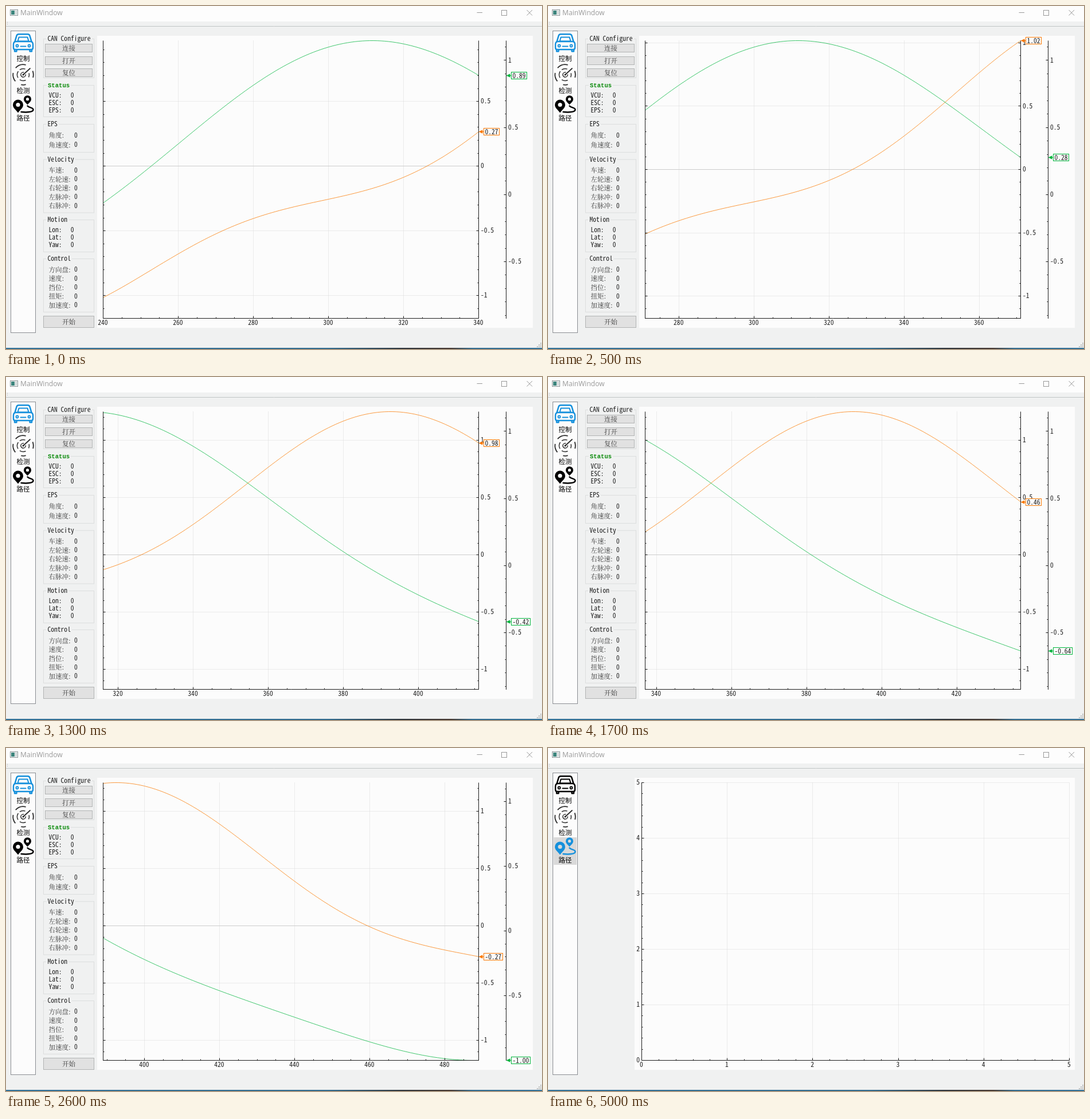
Animation, 935 px wide and 599 px high, one loop 7 s. Source, as an HTML page with a canvas:

```html
<!DOCTYPE html>
<html lang="zh">
<head>
<meta charset="utf-8">
<title>MainWindow</title>
<style>
  html, body { margin: 0; width: 100%; height: 100%; overflow: hidden; background: #f0f1f1; }
  canvas { display: block; }
</style>
</head>
<body>
<canvas id="stage" width="935" height="599"></canvas>
<script>
const ctx = document.getElementById('stage').getContext('2d');
const MONO_FAMILY = '"Noto Sans Mono CJK SC", "Liberation Mono", monospace';
const BG = '#f0f1f1', PAPER = '#fcfcfc', INK = '#1c1c1c', BLUE = '#1590dc';
const ORANGE = '#fa7800', GREEN = '#00b43c';
const TOP = 60.5, BOTTOM = 545.5, PITCH = 5.78;
const LOOP = 7000, STEP = 100, RADAR_AT = 2900, ROUTE_AT = 5000;

// the size that gives the monospaced font its character pitch
ctx.font = '100px ' + MONO_FAMILY;
const MONO = `${(PITCH * 100 / ctx.measureText('0').width).toFixed(2)}px ${MONO_FAMILY}`;
const CJK = '11.5px "Noto Serif CJK SC", "Noto Sans CJK SC", "Noto Sans CJK", serif';
const MENU = '11.5px "Noto Sans CJK SC", "Noto Sans CJK", sans-serif';

// [step, newest sample] pairs; samples arrive at a nearly constant rate
const SAMPLES = [[0, 340], [3, 360], [5, 371], [9, 394], [17, 437], [22, 466], [28, 501]];

const orangeAt = n => Math.sin(n / 50) + Math.sin(n / 50 / 0.3843) * 0.25;
const greenAt = n => Math.cos(n / 50) + Math.sin(n / 50 / 0.4364) * 0.15;

function newestSample(step) {
  const i = Math.max(1, SAMPLES.findIndex(s => s[0] >= step));
  const [a, from] = SAMPLES[i - 1], [b, to] = SAMPLES[i];
  return Math.round(from + (to - from) * (step - a) / (b - a));
}

function rangeOf(fn, last) {
  const values = Array.from({ length: last + 1 }, (_, n) => fn(n));
  return [Math.min(...values), Math.max(...values)];
}

const scale = ([lo, hi], from, to) => v => from + (v - lo) / (hi - lo) * (to - from);
const crisp = v => Math.floor(v) + 0.5;

function rect(x, y, w, h, fill, stroke) {
  if (fill) { ctx.fillStyle = fill; ctx.fillRect(x, y, w, h); }
  if (stroke) { ctx.strokeStyle = stroke; ctx.lineWidth = 1; ctx.strokeRect(x, y, w, h); }
}

function line(x1, y1, x2, y2, color = INK, dash = []) {
  ctx.strokeStyle = color;
  ctx.lineWidth = 1;
  ctx.setLineDash(dash);
  ctx.beginPath();
  ctx.moveTo(x1, y1);
  ctx.lineTo(x2, y2);
  ctx.stroke();
  ctx.setLineDash([]);
}

// y is the vertical middle of the digits or ideographs
function text(str, x, y, { font, color, align = 'left' } = {}) {
  const wide = /[\u4e00-\u9fff]/.test(str);
  ctx.font = font || (wide ? CJK : MONO);
  ctx.fillStyle = color || (wide ? '#3a3a3a' : INK);
  ctx.textAlign = align;
  ctx.fillText(str, x, y + (wide ? 4.3 : 3.7));
}

function ticks([lo, hi], step) {
  const list = [];
  for (let i = Math.ceil(lo / step - 1e-6); i <= hi / step + 1e-6; i++) list.push(i * step);
  return list;
}

function vAxis(x, range, major, minor, { dir = -1, label = 0 } = {}) {
  const y = scale(range, BOTTOM, TOP);
  line(x, TOP, x, BOTTOM + 0.5);
  ticks(range, minor).forEach(v => line(x, crisp(y(v)), x + dir * 2, crisp(y(v))));
  ticks(range, major).forEach(v => {
    line(x, crisp(y(v)), x + dir * 4, crisp(y(v)));
    const name = String(+v.toFixed(2));
    if (label > 0) text(name, x + 3.5, y(v));
    if (label < 0) text(name, x - 3.5, y(v), { align: 'right' });
  });
}

function hAxis(left, right, range, major, minor) {
  const x = scale(range, left, right);
  line(left, BOTTOM, right + 0.5, BOTTOM);
  ticks(range, minor).forEach(v => line(crisp(x(v)), BOTTOM, crisp(x(v)), BOTTOM - 2));
  ticks(range, major).forEach(v => {
    line(crisp(x(v)), BOTTOM, crisp(x(v)), BOTTOM - 4);
    text(String(v), x(v) - 0.7, 552.8, { align: 'center' });
  });
}

function grid(left, right, xRange, xStep, yRange, yStep) {
  const x = scale(xRange, left, right), y = scale(yRange, BOTTOM, TOP);
  const faint = '#dadada', dots = [1, 1];
  ticks(xRange, xStep).forEach(v => line(crisp(x(v)), TOP, crisp(x(v)), BOTTOM, faint, dots));
  ticks(yRange, yStep).forEach(v =>
    line(left, crisp(y(v)), right, crisp(y(v)), v ? faint : '#cccccc', v ? dots : []));
}

function curve(fn, left, right, xRange, yRange, color) {
  const x = scale(xRange, left, right), y = scale(yRange, BOTTOM, TOP);
  ctx.strokeStyle = color;
  ctx.lineWidth = 0.75;
  ctx.beginPath();
  for (let n = xRange[0]; n <= xRange[1]; n++) ctx.lineTo(x(n), y(fn(n)));
  ctx.stroke();
}

function tag(x, y, str, color) {
  const w = str.length * PITCH + 4, cy = crisp(y);
  line(x + 5, cy, x + 9, cy, color);
  ctx.fillStyle = color;
  ctx.beginPath();
  ctx.moveTo(x, cy);
  ctx.lineTo(x + 7, cy - 3.2);
  ctx.lineTo(x + 7, cy + 3.2);
  ctx.fill();
  rect(x + 9, cy - 6, Math.round(w), 12, PAPER, color);
  text(str, x + 11, cy + 0.3);
}

function button(x, y, w, h, label) {
  rect(x, y, w, h, '#e1e1e1', '#b2b4b4');
  text(label, x + w / 2, y + h / 2, { align: 'center' });
}

function group(title, y, h, w = 88, look = {}) {
  rect(65.5, y + 0.5, w, h, null, '#dcdede');
  const x = look.font ? 73 : 72.5;
  ctx.font = look.font || (title > '\u4e00' ? CJK : MONO);
  rect(x - 2, y - 4, ctx.measureText(title).width + 4, 9, BG);
  text(title, x, y + 0.3, look);
}

function rows(labels, y, pitch, valueX) {
  labels.split(' ').forEach((label, i) => {
    text(label + ':', 74.5, y + i * pitch);
    text('0', valueX, y + i * pitch);
  });
}

function shape(d, color, width) {
  const path = new Path2D(d);
  if (width) {
    ctx.strokeStyle = color;
    ctx.lineWidth = width;
    ctx.lineCap = ctx.lineJoin = 'round';
    ctx.stroke(path);
    ctx.lineCap = 'butt';
    ctx.lineJoin = 'miter';
  } else {
    ctx.fillStyle = color;
    ctx.fill(path);
  }
}

function arc(x, y, r, from, to, color, width) {
  ctx.beginPath();
  ctx.arc(x, y, r, from * Math.PI / 180, to * Math.PI / 180);
  ctx.strokeStyle = ctx.fillStyle = color;
  ctx.lineWidth = width || 1;
  width ? ctx.stroke() : ctx.fill();
}

function carIcon(color) {
  shape('M15.5 62 L18.5 52 Q19.3 49.3 22 49.3 H38 Q40.7 49.3 41.5 52 L44.5 62', color, 2.6);
  shape('M20.5 61.5 L22.5 54.5 H37.5 L39.5 61.5 Z', color, 2);
  shape('M16.5 62 H43.5 Q47 63 47 67 V73 Q47 76 44 76 H16 Q13 76 13 73 V67 Q13 63 16.5 62 Z', color, 2.4);
  shape('M15 77 V79.3 H18.5 V77 M41.5 77 V79.3 H45 V77', color, 2.4);
  shape('M25.5 70.5 H34.5', color, 2);
  arc(19.5, 69.5, 2, 0, 360, color, 1.8);
  arc(40.5, 69.5, 2, 0, 360, color, 1.8);
}

function radarIcon(color) {
  [[-22, 16], [75, 102], [140, 190], [222, 285]].forEach(([a, b]) => arc(30, 120, 17.8, a, b, color, 1.8));
  [[-15, 25], [65, 125], [150, 215], [235, 290]].forEach(([a, b]) => arc(30, 120, 10.5, a, b, color, 1.5));
  arc(30, 120, 4.2, -10, 285, color, 1.5);
  arc(30, 120, 1.6, 0, 360, color);
  shape('M30 120 L42 109', color, 1.8);
}

function routeIcon(color, hole) {
  shape('M21 186.5 C17 181 12 178 12 172.5 A9 9 0 0 1 30 172.5 C30 178 25 181 21 186.5 Z', color);
  shape('M37.5 172.5 C35 169 31 167 31 162.7 A6.5 6.5 0 0 1 44 162.7 C44 167 40 169 37.5 172.5 Z', color);
  arc(21, 172.5, 3.6, 0, 360, hole);
  arc(37.5, 162.7, 2.6, 0, 360, hole);
  shape('M37.5 174.5 C40 178 47.5 177 47.5 181 C47.5 185.5 36 186 26.5 185', color, 2.4);
}

function sidebar(active) {
  rect(8.5, 43.5, 43, 527, PAPER, '#8a8d92');
  if (active === 1) rect(10, 100, 40, 56, '#d9d9d9');
  if (active === 2) rect(10, 156, 40, 48, '#d9d9d9');
  carIcon(active === 0 ? BLUE : '#000');
  radarIcon(active === 1 ? BLUE : '#2c2c2c');
  routeIcon(active === 2 ? BLUE : '#000', active === 2 ? '#d9d9d9' : PAPER);
  [['控制', 92], ['检测', 148], ['路径', 196]].forEach(([label, y]) =>
    text(label, 30, y, { align: 'center', color: '#000', font: MENU }));
}

function windowFrame() {
  rect(0, 0, 935, 599, BG);
  rect(0, 0, 935, 27, '#fdfdfd');
  rect(7.5, 6.5, 13, 10, '#f4f6f6', '#8b9496');
  rect(9, 8, 6, 7, '#3d857d');
  rect(16, 8, 3, 7, '#cfd6d6');
  text('MainWindow', 25, 12.2, { font: '12.1px "Open Sans", sans-serif', color: '#999' });
  line(821.5, 11.5, 831, 11.5, '#999');
  rect(864.5, 7.5, 9, 9, null, '#999');
  line(908.5, 7, 918, 16.5, '#999');
  line(908.5, 16.5, 918, 7, '#999');
  rect(2, 28, 1, 1, '#a8a8a8');
  rect(2, 31, 1, 1, '#a8a8a8');
  line(0, 35.5, 935, 35.5, '#c0c5c5');
  for (let r = 0; r < 3; r++)
    for (let c = 2 - r; c < 3; c++) rect(926 + c * 3, 588 + r * 3, 2, 2, '#b9bcbc');
  const edge = ctx.createLinearGradient(0, 0, 935, 0);
  [[0, '#2f7098'], [0.6, '#2f6a8e'], [0.74, '#2c3238'], [0.83, '#44362f'], [0.87, '#2f6a8e'], [1, '#2f7098']]
    .forEach(([at, color]) => edge.addColorStop(at, color));
  rect(0, 597, 935, 2, edge);
}

function controlPage(step) {
  group('CAN Configure', 57, 68);
  button(68.5, 66.5, 82, 14, '连接');
  button(68.5, 88.5, 82, 14, '打开');
  button(68.5, 109.5, 82, 14, '复位');
  group('Status', 138, 55, 88, { font: 'bold 10.6px "Liberation Mono", monospace', color: '#0a8a0a' });
  rows('VCU ESC EPS', 156.2, 13.1, 112.7);
  group('EPS', 206, 49);
  rows('角度 角速度', 226, 16.7, 119);
  group('Velocity', 267.5, 93);
  rows('车速 左轮速 右轮速 左脉冲 右脉冲', 287, 15.5, 119);
  group('Motion', 373, 56);
  rows('Lon Lat Yaw', 391.5, 13.1, 112.7);
  group('Control', 441, 93);
  rows('方向盘 速度 挡位 扭矩 加速度', 460.7, 15.4, 119);
  button(65.5, 541.5, 88, 20, '开始');

  const last = newestSample(step), left = 169.5, right = 824.5, outer = 872.5;
  const xRange = [last - 100, last];
  const inner = rangeOf(orangeAt, last), second = rangeOf(greenAt, last);
  rect(159, 52, 760, 510, PAPER);
  grid(left, right, xRange, 20, inner, 0.5);
  curve(orangeAt, left, right, xRange, inner, ORANGE);
  curve(greenAt, left, right, xRange, second, GREEN);
  hAxis(left, right, xRange, 20, 5);
  vAxis(left, inner, 0.5, 0.1, { dir: 1 });
  vAxis(right, inner, 0.5, 0.1, { label: 1 });
  vAxis(outer, second, 0.5, 0.1, { label: 1 });
  const tagFor = (x, fn, range, color) =>
    tag(x, scale(range, BOTTOM, TOP)(fn(last)), fn(last).toFixed(2), color);
  tagFor(right, orangeAt, inner, ORANGE);
  tagFor(outer, greenAt, second, GREEN);
}

function radarPage() {
  const range = [0, 5], left = 182.5, right = 857.5;
  group('避障距离', 57, 50, 101);
  [['前:', 77], ['后:', 94.3]].forEach(([side, y]) => {
    text(side, 74.5, y);
    text('0', 96.5, y);
    text('中间', 108, y);
    text('正常', 136.5, y);
  });
  rect(173, 52, 746, 510, PAPER);
  grid(left, right, range, 1, range, 1);
  hAxis(left, right, range, 1, 0.2);
  vAxis(left, range, 1, 0.2, { dir: 1 });
  vAxis(right, range, 1, 0.2, { label: 1 });
  vAxis(889.5, range, 1, 0.2, { label: 1 });
  tag(right, BOTTOM, 'text', GREEN);
}

function routePage() {
  const range = [0, 5], left = 163.5, right = 909.5;
  rect(151, 52, 768, 510, PAPER);
  grid(left, right, range, 1, range, 1);
  hAxis(left, right, range, 1, 0.2);
  vAxis(left, range, 1, 0.2, { dir: 1, label: -1 });
}

function draw(now) {
  const t = now % LOOP;
  const page = t < RADAR_AT ? 0 : t < ROUTE_AT ? 1 : 2;
  windowFrame();
  sidebar(page);
  [controlPage, radarPage, routePage][page](Math.floor(t / STEP));
}

const start = performance.now();
function tick() {
  draw(performance.now() - start);
  requestAnimationFrame(tick);
}
tick();
</script>
</body>
</html>
```
